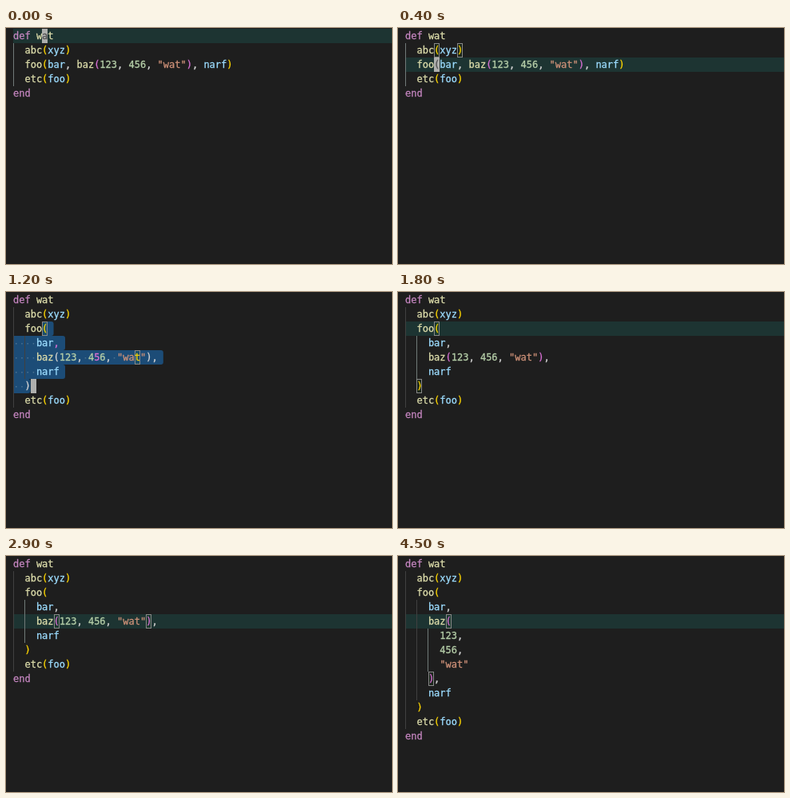
These frames come from a looping animation (483 px wide and 296 px high, 4.6 s). An HTML page with a canvas:

```html
<!DOCTYPE html>
<html lang="en">
<head>
<meta charset="utf-8">
<title>Splitting call arguments</title>
<style>
  html, body { margin: 0; width: 100%; height: 100%; overflow: hidden; background: #1e1e1e; }
  canvas { display: block; }
</style>
</head>
<body>
<canvas id="stage" width="483" height="296"></canvas>
<script>
const ctx = document.getElementById("stage").getContext("2d");
const WIDTH = 483, HEIGHT = 296, LOOP = 4600;
const LEFT = 9, TOP = 1, LINE = 18, ADVANCE = 7.224;

const color = {
  back: "#1e1e1e", line: "#1d3432", selection: "#1c4c77", dot: "#4c7392",
  keyword: "#c586c0", call: "#dcdcaa", variable: "#9cdcfe", number: "#b5cea8",
  string: "#ce9178", plain: "#d4d4d4", gold: "#ffd700", orchid: "#da70d6",
  guide: "#404040", activeGuide: "#707a78", box: "#888888",
  cursor: "#aeafad", cursorText: "#515052"
};

// Guides are [column, first row, last row].
const joined = {
  lines: ["def wat", "  abc(xyz)", "  foo(bar, baz(123, 456, \"wat\"), narf)", "  etc(foo)", "end"],
  guides: [[0, 1, 3]]
};
const split = {
  lines: ["def wat", "  abc(xyz)", "  foo(", "    bar,", "    baz(123, 456, \"wat\"),",
    "    narf", "  )", "  etc(foo)", "end"],
  guides: [[0, 1, 7], [2, 3, 5]]
};
const nested = {
  lines: ["def wat", "  abc(xyz)", "  foo(", "    bar,", "    baz(", "      123,", "      456,",
    "      \"wat\"", "    ),", "    narf", "  )", "  etc(foo)", "end"],
  guides: [[0, 1, 11 - 0], [2, 3, 9], [4, 5, 7]]
};

// Selection spans are [row, first column, end column]; tints are keyed by "row,column".
const pasted = {
  doc: split, cursor: [6, 3], boxes: [[2, 5], [4, 21]], active: -1, noLine: true,
  selection: [[2, 5, 7], [3, 0, 9], [4, 0, 26], [5, 0, 9], [6, 0, 3]],
  tints: {
    "3,7": color.orchid, "4,7": color.plain, "4,14": color.orchid,
    "4,21": color.gold, "4,23": color.plain, "6,2": color.plain
  }
};

const atFoo = { doc: joined, cursor: [2, 5], boxes: [[2, 5], [2, 37]], active: 0 };
const atSplit = { doc: split, cursor: [2, 5], boxes: [[2, 5], [6, 2]], active: 1 };
const atBaz = { doc: split, cursor: [4, 7], boxes: [[4, 7], [4, 23]], active: 1 };
const atNested = { doc: nested, cursor: [4, 7], boxes: [[4, 7], [8, 4]], active: 2 };
const off = view => ({ ...view, hidden: true });

const timeline = [
  [0, { ...atFoo, cursor: [0, 5], boxes: [] }],
  [300, { ...atFoo, cursor: [1, 5], boxes: [] }],
  [400, { ...atFoo, boxes: [[1, 5], [1, 9]] }],
  [500, atFoo],
  [800, off(atFoo)],
  [1100, atFoo],
  [1200, pasted],
  [1300, atSplit],
  [1800, off(atSplit)],
  [1900, { ...atSplit, cursor: [3, 5] }],
  [2000, { ...atBaz, cursor: [4, 6], boxes: [] }],
  [2300, { ...atBaz, boxes: [] }],
  [2400, atBaz],
  [2800, off(atBaz)],
  [3000, { ...atNested, boxes: [], active: 1 }],
  [3100, atNested],
  [3500, off(atNested)],
  [4000, atNested],
  [4500, off(atNested)]
];

// Returns one list of character colours per line.
function highlight(lines) {
  let depth = 0;
  return lines.map(line => {
    const shades = [];
    for (const match of line.matchAll(/"[^"]*"|\d+|\w+|\s+|./g)) {
      const token = match[0];
      const next = line[match.index + token.length];
      let shade = color.plain;
      if (token === "def" || token === "end") shade = color.keyword;
      else if (token[0] === '"') shade = color.string;
      else if (/\d/.test(token)) shade = color.number;
      else if (/\w/.test(token)) shade = next === "(" || line.startsWith("def") ? color.call : color.variable;
      else if (token === "(") shade = depth++ ? color.orchid : color.gold;
      else if (token === ")") shade = --depth ? color.orchid : color.gold;
      for (const _ of token) shades.push(shade);
    }
    return shades;
  });
}
for (const doc of [joined, split, nested]) doc.shades = highlight(doc.lines);

const columnX = column => LEFT + column * ADVANCE;
const rowY = row => TOP + row * LINE;

function fill(x, y, width, height, paint) {
  ctx.fillStyle = paint;
  ctx.fillRect(x, y, width, height);
}

function drawChar(char, row, column, paint) {
  ctx.fillStyle = ctx.strokeStyle = paint;
  ctx.fillText(char, columnX(column), rowY(row) + 13);
  ctx.strokeText(char, columnX(column), rowY(row) + 13);
}

function drawBox([row, column]) {
  const x = Math.round(columnX(column)), y = rowY(row);
  fill(x, y, 7, LINE, "rgba(0, 100, 0, 0.1)");
  ctx.lineWidth = 1;
  ctx.strokeStyle = color.box;
  ctx.strokeRect(x + 0.5, y + 0.5, 6, LINE - 1);
}

function drawText(view) {
  const selected = (row, column) => (view.selection || [])
    .some(([r, from, to]) => r === row && column >= from && column < to);
  ctx.font = '12px "DejaVu Sans Mono", monospace';
  ctx.lineWidth = 0.3;
  view.doc.lines.forEach((line, row) => [...line].forEach((char, column) => {
    if (char !== " ") {
      const tint = view.tints && view.tints[row + "," + column];
      drawChar(char, row, column, tint || view.doc.shades[row][column]);
    } else if (selected(row, column)) {
      fill(columnX(column) + 3, rowY(row) + 9, 1.5, 1.5, color.dot);
    }
  }));
}

function drawCursor(view) {
  const [row, column] = view.cursor;
  fill(Math.round(columnX(column)), rowY(row), 7, LINE, color.cursor);
  const char = view.doc.lines[row][column];
  if (char) drawChar(char, row, column, color.cursorText);
}

function draw(view) {
  fill(0, 0, WIDTH, HEIGHT, color.back);
  if (!view.noLine) fill(LEFT, rowY(view.cursor[0]), WIDTH - LEFT, LINE, color.line);
  for (const [row, from, to] of view.selection || []) {
    ctx.fillStyle = color.selection;
    ctx.beginPath();
    ctx.roundRect(columnX(from), rowY(row), (to - from) * ADVANCE, LINE, [0, 3, 3, 0]);
    ctx.fill();
  }
  view.doc.guides.forEach(([column, first, last], i) => {
    const paint = i === view.active ? color.activeGuide : color.guide;
    fill(Math.floor(columnX(column)), rowY(first), 1, (last - first + 1) * LINE, paint);
  });
  view.boxes.forEach(drawBox);
  drawText(view);
  if (!view.hidden) drawCursor(view);
}

const start = performance.now();
function tick() {
  const time = (performance.now() - start) % LOOP;
  draw(timeline.findLast(([at]) => at <= time)[1]);
  requestAnimationFrame(tick);
}
tick();
</script>
</body>
</html>
```
